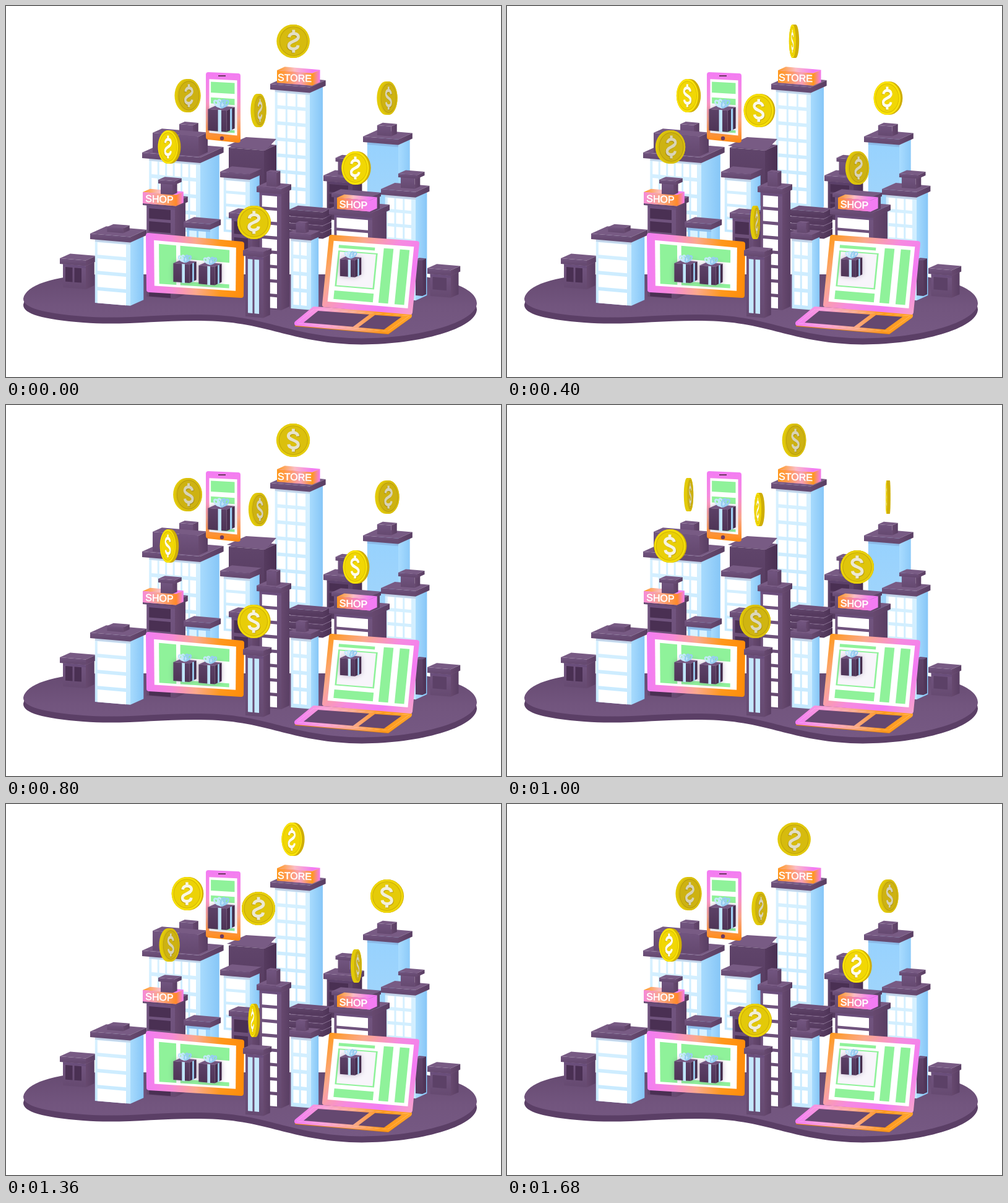
Write an HTML page with a canvas that moves like this. It is 800x600 px and loops after 1.72 s.

```html
<!DOCTYPE html>
<html lang="en">
<head>
<meta charset="utf-8">
<title>Shopping city</title>
<style>
html, body { margin: 0; width: 800px; height: 600px; overflow: hidden; background: #fff; }
canvas { display: block; }
</style>
</head>
<body>
<canvas id="stage" width="800" height="600"></canvas>
<script>
const stage = document.getElementById('stage').getContext('2d');
const layer = document.createElement('canvas');
layer.width = 800;
layer.height = 600;
let g = layer.getContext('2d');

// shared view: slope of front edges, rise and length of receding edges
const SLOPE = 0.085, RISE = 0.45, DEPTH = 0.4;
const ROOF = 9, OVERHANG = 0.12;

// top, front (two stops), side (two stops)
const PLUM = ['#785b84', '#725580', '#664a71', '#67496f', '#593e63'];
const DARK = ['#6e517a', '#60456b', '#553a5e', '#563b5f', '#4a3053'];
const ICE = ['#e4f6ff', '#d8f1ff', '#c5e9ff', '#a8dbfd', '#86c6f7'];
const SKY = ['#b5e0ff', '#97d2fe', '#a2d5fa', '#a9dcff', '#8ccaf8'];
const PINK = '#f37cf3', ORANGE = '#ff981b', SALMON = '#fba98c';
const GREEN = '#8ff29a', SHADE = '#4a3053';

function grad(x0, y0, x1, y1, ...stops) {
  const f = g.createLinearGradient(x0, y0, x1, y1);
  stops.forEach((c, i) => f.addColorStop(i / (stops.length - 1), c));
  return f;
}

function poly(fill, ...points) {
  g.beginPath();
  for (let i = 0; i < points.length; i += 2) g.lineTo(points[i], points[i + 1]);
  g.closePath();
  g.fillStyle = fill;
  g.fill();
}

// front-facing rectangle in the shared view
function face(x, y, w, h, fill) {
  const b = y + w * SLOPE;
  poly(fill, x, y, x + w, b, x + w, b + h, x, y + h);
}

// x, y: top left corner of the front
function box(x, y, w, h, skin = PLUM, d = w * DEPTH) {
  const [top, f0, f1, s0, s1] = skin;
  const r = x + w, b = y + w * SLOPE, up = d * RISE;
  poly(top, x, y, x + d, y - up, r + d, b - up, r, b);
  poly(grad(r, 0, r + d, 0, s0, s1), r, b, r + d, b - up, r + d, b - up + h, r, b + h);
  face(x, y, w, h, grad(x, y, x, y + h, f0, f1));
}

function flue(x, base, w, h, cap) {
  box(x, base - h, w, h + 2);
  if (cap) box(x - 4, base - h - 5, w + 8, 6);
}

// fills a front with rows of windows, as many as fit
function panes(x, y, w, h, cols, pitch, fill) {
  const step = (w - 8) / cols;
  for (let r = 0; (r + 0.8) * pitch < h - 4; r++)
    for (let c = 0; c < cols; c++)
      face(x + 4 + c * step, y + 5 + r * pitch + c * step * SLOPE, step - 3, pitch * 0.78, fill);
}

// opt: cols and pitch of the windows, glass; at, tall, cap of the flue
function house(x, y, w, bottom, skin, opt = {}) {
  const inset = w * OVERHANG, bx = x + inset, by = y + ROOF, bw = w - inset;
  const h = bottom - by;
  box(bx, by, bw, h, skin, w * DEPTH - inset * 0.6);
  if (opt.cols) panes(bx, by, bw, h, opt.cols, opt.pitch, opt.glass || '#fff');
  face(bx, by, bw, 4, 'rgba(70,40,100,.15)');
  box(x, y, w, ROOF);
  if (opt.tall) flue(x + w * opt.at, y - w * DEPTH * RISE * 0.4, w * 0.4, opt.tall, opt.cap);
}

function sign(x, y, w, h, text, ...colors) {
  const front = grad(x, 0, x + w, 0, ...colors);
  const last = colors[colors.length - 1];
  box(x, y, w, h, [grad(x, 0, x + w, 0, ORANGE, '#fbbcc4', PINK), PINK, PINK, last, PINK], w * 0.22);
  face(x, y, w, h, front);
  g.save();
  g.translate(x + w / 2, y + w * SLOPE / 2 + h / 2 + 1);
  g.transform(1, 0.04, 0, 1, 0, 0);
  g.font = '16px "Liberation Sans", Arial, sans-serif';
  g.textAlign = 'center';
  g.textBaseline = 'middle';
  g.fillStyle = g.strokeStyle = '#fff';
  g.lineWidth = 0.6;
  g.fillText(text, 0, 0);
  g.strokeText(text, 0, 0);
  g.restore();
}

// rounded frame through four corners; returns a painter in 0..1 screen units
function device([ax, ay, bx, by, cx, cy, dx, dy], fill, mu, mv) {
  const at = (u, v) => [
    (1 - v) * ((1 - u) * ax + u * bx) + v * ((1 - u) * dx + u * cx),
    (1 - v) * ((1 - u) * ay + u * by) + v * ((1 - u) * dy + u * cy)];
  const quad = (u0, v0, u1, v1, color) =>
    poly(color, ...at(u0, v0), ...at(u1, v0), ...at(u1, v1), ...at(u0, v1));
  g.lineJoin = 'round';
  g.lineWidth = 8;
  quad(0, 0, 1, 1, fill);
  g.strokeStyle = fill;
  g.stroke();
  const paint = (u0, v0, u1, v1, color = GREEN) => quad(
    mu + (1 - 2 * mu) * u0, mv + (1 - 2 * mv) * v0,
    mu + (1 - 2 * mu) * u1, mv + (1 - 2 * mv) * v1, color);
  paint(0, 0, 1, 1, '#fff');
  return paint;
}

// x, y: middle of the front; s: scale
function gift(x, y, s) {
  g.save();
  g.translate(x, y);
  g.scale(s, s);
  g.shadowColor = 'rgba(90,60,110,.35)';
  g.shadowBlur = 8;
  box(-20, -16, 28, 32, ['#775a83', '#5c4167', '#4f3557', '#49304f', '#432a4a'], 12);
  g.shadowBlur = 0;
  face(-5, -15, 5, 33, '#bfe6fc');
  poly('#9ccff3', 13, -16, 16, -17, 16, 15, 13, 17);
  g.translate(0, -18);
  g.lineWidth = 2.6;
  for (const turn of [-1, 1, -0.35, 0.4]) {
    g.beginPath();
    g.ellipse(turn * 6, -6, 3, 6, turn * 0.8, 0, 7);
    g.strokeStyle = turn > 0 ? '#97cdf2' : '#c3e8fd';
    g.stroke();
  }
  g.restore();
}

function ground() {
  const blob = new Path2D('M28 473C32 452 75 436 150 434H640C705 438 761 455 761 481' +
    'C759 514 655 541 555 537C450 531 420 500 315 499C245 498 190 507 125 502C60 497 27 488 28 473Z');
  g.save();
  g.translate(0, 10);
  g.fillStyle = '#5b3f66';
  g.fill(blob);
  g.translate(0, -10);
  g.fillStyle = grad(0, 434, 0, 538, '#664a71', '#72557e', '#765983');
  g.fill(blob);
  g.restore();
}

function backRow() {
  house(577, 211, 57, 340, SKY, { at: 0.4, tall: 14 });
  house(427, 126, 64, 330, ICE, { cols: 3, pitch: 26 });
  sign(438, 104, 57, 20, 'STORE', ORANGE, '#ff9a5a', '#f7a0b8', ORANGE);

  flue(280, 209, 22, 18);
  house(220, 237, 94, 360, ICE, { cols: 6, pitch: 27 });
  box(237, 205, 74, 32, PLUM, 15);

  box(360, 229, 57, 90, DARK, 20);
  poly(PLUM[0], 357, 226, 388, 212, 437, 215, 419, 234);

  house(513, 274, 47, 345, DARK, { cols: 1, pitch: 16, glass: SHADE, at: 0.5, tall: 20, cap: true });
  house(346, 268, 48, 365, ICE, { cols: 1, pitch: 21 });
}

function middleRow() {
  house(360, 334, 38, 400, PLUM, { cols: 1, pitch: 26, glass: SHADE });
  for (let i = 3; i >= 0; i--) box(458, 329 + i * 11, 54, 10, DARK, 14);

  house(221, 313, 52, 470, PLUM, { cols: 1, pitch: 21, glass: SHADE });
  sign(221, 301, 54, 18, 'SHOP', '#f58ad8', SALMON, '#ff8a2a');
  flue(250, 302, 19, 16, true);

  house(287, 349, 43, 400, SKY, { cols: 2, pitch: 22, glass: '#d9f2ff' });
  house(606, 296, 56, 472, ICE, { cols: 3, pitch: 23, at: 0.57, tall: 16, cap: true });

  house(522, 328, 70, 440, PLUM, { cols: 1, pitch: 21 });
  box(530, 307, 60, 22, PLUM, 14);
  box(526, 303, 65, 6, PLUM, 15);
  sign(535, 310, 53, 18, 'SHOP', ORANGE, '#f784b4', PINK);

  box(662, 410, 11, 58, DARK, 6);
  house(681, 424, 38, 469, PLUM, { cols: 1, pitch: 26, glass: '#5c4167' });
  house(456, 367, 37, 489, ICE, { cols: 2, pitch: 27, at: 0.34, tall: 14 });
  house(87, 408, 42, 455, PLUM, { cols: 2, pitch: 30, glass: SHADE });
  house(405, 292, 40, 489, PLUM, { cols: 1, pitch: 23.3, at: 0.4, tall: 21 });
}

function tablet() {
  const paint = device([230, 371, 381, 385, 380, 468, 231, 459],
    grad(228, 0, 386, 0, PINK, '#f78ad8', SALMON, ORANGE, '#ff8c08'), 0.06, 0.08);
  paint(0.06, 0.07, 0.27, 0.95);
  paint(0.32, 0.07, 0.92, 0.36);
  paint(0.32, 0.86, 0.92, 0.95);
  for (const x of [289, 330]) gift(x, 431 + (x - 289) * SLOPE, 0.93);
}

function laptop() {
  const metal = grad(468, 0, 654, 0, PINK, '#f9a0d8', SALMON, ORANGE, '#ffa42c');
  poly('#d98018', 467, 514, 655, 500, 655, 504, 618, 531, 467, 518);
  const keys = device([470, 513, 498, 490, 652, 501, 617, 526], metal, 0, 0);
  keys(0, 0, 1, 1, metal);
  keys(0.08, 0.06, 0.9, 0.6, '#654870');
  keys(0.08, 0.66, 0.9, 0.94, '#654870');

  const paint = device([526, 374, 664, 384, 653, 495, 515, 483],
    grad(520, 375, 664, 495, ORANGE, SALMON, '#f68ae0', PINK, '#f9a8c8'), 0.03, 0.05);
  paint(0.07, 0.06, 0.52, 0.11);
  paint(0.07, 0.15, 0.56, 0.74);
  paint(0.09, 0.17, 0.54, 0.72, '#f8f5fb');
  paint(0.07, 0.81, 0.56, 0.95);
  for (const u of [0.63, 0.83]) paint(u, 0.06, u + 0.12, 0.95);
  gift(557, 423, 0.86);
}

function phone() {
  const paint = device([327, 111, 375, 113, 375, 217, 327, 212],
    grad(0, 108, 0, 220, PINK, '#f68ae0', SALMON, '#ff8a12'), 0.03, 0.07);
  paint(0.06, 0.05, 0.91, 0.25);
  paint(0.06, 0.34, 0.91, 0.45);
  paint(0.06, 0.91, 0.91, 0.96);
  g.fillStyle = '#6b3a60';
  g.fillRect(343, 112, 12, 2);
  g.beginPath();
  g.arc(349, 214, 3.2, 0, 7);
  g.fill();
  gift(348, 184, 1.08);
}

function frontRow() {
  house(136, 368, 65, 480, ICE, { cols: 1, pitch: 26, at: 0.42, tall: 6 });
  tablet();
  house(383, 395, 33, 502, PLUM, { cols: 2, pitch: 112, glass: '#c5e8fd' });
  laptop();
  phone();
}

ground();
backRow();
middleRow();
frontRow();
g = stage;

// centre and starting angle in degrees; at 0 the mirrored side faces us
const COINS = [
  [464, 57, 16], [293.5, 145, 45], [408, 169, 68], [616, 149, 238],
  [264, 228, 307], [566, 262, 325], [401, 350, 353]
];
const RADIUS = 27, THICK = 5.5, STEP = 40, LOOP = 1720, TURN = 42;
const dollar = new Path2D('M7.5-6.5C7-14.5-8-14.5-8-7C-8 0 8 0 8 7C8 14.5-7 14.5-7.5 6.5M0-18.5V-12M0 12V18.5');

const mix = (a, b, k) => `rgb(${a.map((v, i) => Math.round(v + (b[i] - v) * k))})`;

function coin(x, y, deg) {
  const a = deg * Math.PI / 180, c = Math.cos(a);
  const nx = Math.sin(a) * Math.sign(c), nz = Math.max(Math.abs(c), 0.01);
  const lit = Math.min(1, Math.max(0, 0.5 - nx * 0.9));
  const off = nx * THICK / 2;

  // the edge spans both faces
  g.fillStyle = nx > 0 ? '#e2ca08' : '#cfae06';
  for (const s of [-off, off]) {
    g.beginPath();
    g.ellipse(x + s, y, RADIUS * nz, RADIUS, 0, 0, 7);
    g.fill();
  }
  g.fillRect(x - Math.abs(off), y - RADIUS, Math.abs(off) * 2, RADIUS * 2);

  const disc = (r, fill) => {
    g.beginPath();
    g.arc(0, 0, r, 0, 7);
    g.fillStyle = fill;
    g.fill();
  };
  g.save();
  g.translate(x + off, y);
  g.scale(c < 0 ? nz : -nz, 1);
  disc(RADIUS, mix([216, 190, 14], [250, 228, 8], lit));
  disc(RADIUS * 0.88, mix([180, 152, 14], [216, 187, 0], lit));
  disc(RADIUS * 0.84, mix([205, 178, 18], [241, 215, 4], lit));
  g.lineWidth = 5;
  g.translate(1, 1);
  g.strokeStyle = mix([168, 142, 20], [205, 172, 10], lit);
  g.stroke(dollar);
  g.translate(-1, -1);
  g.strokeStyle = mix([216, 211, 182], [255, 253, 238], lit);
  g.stroke(dollar);
  g.restore();
}

function draw() {
  const step = Math.floor(performance.now() % LOOP / STEP);
  g.fillStyle = '#fff';
  g.fillRect(0, 0, 800, 600);
  g.drawImage(layer, 0, 0);
  for (const [x, y, start] of COINS) coin(x, y, start + step * 360 / TURN);
  requestAnimationFrame(draw);
}
draw();
</script>
</body>
</html>
```
